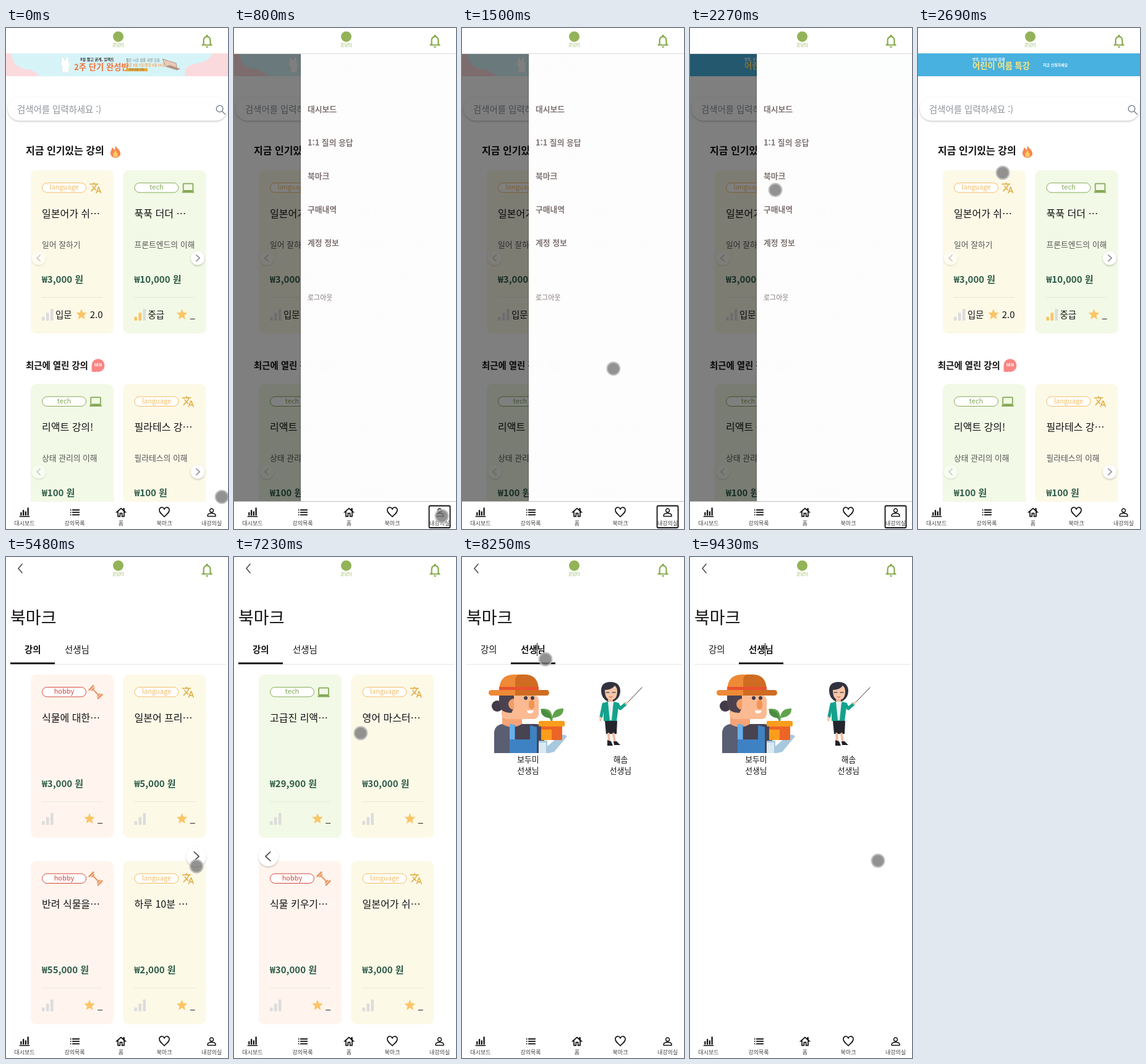
Recreate the animation shown at these times as an HTML page. Size 359 by 810 pixels, loop 9.5 s.

```html
<!DOCTYPE html>
<html lang="ko">
<head>
<meta charset="utf-8">
<style>
html, body { margin: 0; width: 100%; height: 100%; overflow: hidden; background: #fff; }
svg { display: block; width: 359px; height: 810px; font-family: "Noto Sans CJK KR", "Noto Sans CJK", sans-serif; }
</style>
</head>
<body>
<svg id="stage" viewBox="0 0 359 810"></svg>
<script>
const LOOP = 9500;

// Drawing helpers: each returns SVG markup
const text = (x, cy, s, size, weight = 400, fill = '#111', anchor = 'start') =>
  `<text x="${x}" y="${cy + size * .36}" font-size="${size}" font-weight="${weight}" fill="${fill}" text-anchor="${anchor}">${s}</text>`;
const rect = (x, y, w, h, fill, r = 0, more = '') =>
  `<rect x="${x}" y="${y}" width="${w}" height="${h}" rx="${r}" fill="${fill}" ${more}/>`;
const disc = (x, y, r, fill, more = '') => `<circle cx="${x}" cy="${y}" r="${r}" fill="${fill}" ${more}/>`;
const path = (d, fill, more = '') => `<path d="${d}" fill="${fill}" ${more}/>`;
const line = (d, color, width) =>
  path(d, 'none', `stroke="${color}" stroke-width="${width}" stroke-linecap="round" stroke-linejoin="round"`);
const group = (id, body, more = '') => `<g id="${id}" ${more}>${body}</g>`;
// Places a 24-unit icon around a centre
const icon = (body, cx, cy, size, color) =>
  `<g transform="translate(${cx - size / 2} ${cy - size / 2}) scale(${size / 24})" fill="${color}">${body}</g>`;
const glyph = d => `<path d="${d}"/>`;

const icons = {
  language: glyph('M12.87 15.07l-2.54-2.51.03-.03c1.74-1.94 2.98-4.17 3.71-6.53H17V4h-7V2H8v2H1v1.99h11.17C11.5 7.92 10.44 9.75 9 11.35 8.07 10.32 7.3 9.19 6.69 8h-2c.73 1.63 1.73 3.17 2.98 4.56l-5.09 5.02L4 19l5-5 3.11 3.11.76-2.04zM18.5 10h-2L12 22h2l1.12-3h4.75L21 22h2l-4.5-12zm-2.62 7l1.62-4.33L19.12 17h-3.24z'),
  tech: glyph('M20 18c1.1 0 2-.9 2-2V5c0-1.1-.9-2-2-2H4c-1.1 0-2 .9-2 2v11c0 1.1.9 2 2 2H1v3h22v-3zM4 5h16v11H4z'),
  hobby: '<g transform="rotate(45 12 12)"><path d="M4 10.8h16v2.4H4zM-1 5.5h3.2v13H-1zM3.2 8h2.4v8H3.2zM21.8 5.5H25v13h-3.2zM18.4 8h2.4v8h-2.4z"/></g>',
  bell: glyph('M12 22c1.1 0 2-.9 2-2h-4c0 1.1.9 2 2 2zm6-6v-5c0-3.07-1.63-5.64-4.5-6.32V4c0-.83-.67-1.5-1.5-1.5s-1.5.67-1.5 1.5v.68C7.64 5.36 6 7.92 6 11v5l-2 2v1h16v-1l-2-2zm-2 1H8v-6c0-2.48 1.51-4.5 4-4.5s4 2.02 4 4.5v6z'),
  star: glyph('M12 17.27L18.18 21l-1.64-7.03L22 9.24l-7.19-.61L12 2 9.19 8.63 2 9.24l5.46 4.73L5.82 21z'),
  chart: glyph('M1 20h22v2H1zM3 12h3v7H3zM8 7h3v12H8zM13 10h3v9h-3zM18 2h3v17h-3z'),
  list: glyph('M3 6h2v2.4H3zM7 6h15v2.4H7zM3 11h2v2.4H3zM7 11h15v2.4H7zM3 16h2v2.4H3zM7 16h15v2.4H7z'),
  home: glyph('M12 5.7l5 4.5V19h-2v-6H9v6H7v-8.8zM12 3L1 12.7h4V21h6v-6h2v6h6v-8.3h4l-4-3.6V4h-3v2.4z'),
  heart: line('M12 20.5C4 13.500 2.500 11.500 2.500 8.500A4.800 4.800 0 0 1 12 6.200A4.800 4.800 0 0 1 21.500 8.500C21.500 11.500 20 13.500 12 20.500z', '#111', 2),
  person: line('M12 4a4 4 0 1 0 .01 0zM3.500 20.500v-2.500c0-2.500 5-4 8.500-4s8.500 1.500 8.500 4v2.500z', '#111', 2)
};

const kinds = {
  language: { bg: '#fcf9e7', ink: '#f3bd68', mark: '#e0b04a' },
  tech: { bg: '#f2f9e6', ink: '#86a957', mark: '#86a957' },
  hobby: { bg: '#fff5ee', ink: '#d4473c', mark: '#ee9563' }
};

function card(x, y, kind, title, price, { sub = '', level = '', lit = 0, rate = '_' } = {}) {
  const { bg, ink, mark } = kinds[kind];
  const starX = x + (rate === '_' ? 95 : 82);
  const bars = [0, 1, 2].map(i =>
    rect(x + 18 + i * 7, y + 237 - i * 6.5, 4.5, 6 + i * 6.5, i < lit ? '#f8c469' : '#dcdcdc')).join('');
  return rect(x, y, 134, 264, bg, 9) +
    rect(x + 18.5, y + 20.5, 71, 15.5, '#fff', 7.75, `stroke="${ink}"`) +
    text(x + 54, y + 27.5, kind, 11, 500, ink, 'middle') +
    icon(icons[kind], x + 105, y + 28.5, 21, mark) +
    text(x + 18, y + 70, title, 16, 500) +
    text(x + 18, y + 120, sub, 12.8, 400, '#555') +
    text(x + 18, y + 176.500, price + ' 원', 15, 700, '#2f5d49') +
    rect(x + 18, y + 205, 98, 1, '#e9e7dc') + bars +
    text(x + 40, y + 234, level, 14.4) +
    icon(icons.star, starX, y + 233, 21, '#fbc566') +
    text(x + 116.500, y + 234, rate, 15, 400, '#111', 'end');
}

const arrow = (id, x, y, r, dir, color, opacity = 1) => group(id,
  disc(x, y, r, '#fff', 'filter="url(#soft)"') +
  line(`M${x - dir * r * .2} ${y - r * .45}l${dir * r * .48} ${r * .45}l${-dir * r * .48} ${r * .45}`, color, 1.8),
  `opacity="${opacity}"`);
const arrowPair = y => arrow('', 53, y, 11, -1, '#aaa', .5) + arrow('', 310, y, 11, 1, '#999');

const bannerPink =
  rect(0, 41, 359, 37, '#d6f4f8') +
  path('M0 41h8c3 12 8 20 18 23s20 3 28 14H0z', '#fbdadd') +
  path('M8 41h76c-18 2-11 10-18 17s-18 5-25 8s-22-2-27-9z', '#d6f4f8') +
  path('M290 78c-3-15 6-18 20-21s20-7 23-16h26v37z', '#fbdadd') +
  path('M91 72V62q-4-2-1-8V48q3-3 4 4h2q1-8 5-4v6q4 6 1 9v9z', '#fff', 'stroke="#ddd" stroke-width=".6"') +
  text(120, 51, '8월 짧고 굵게, 임팩트', 6, 700, '#333') +
  text(110, 63, '2주 단기 완성반', 13.3, 900, '#f4743b') +
  text(194, 52, '짧은 시간 집중 과정 모집', 5.3, 400, '#777') +
  text(194, 60, '개강 8월 7일/종강 8월 18일', 5.3, 700, '#f3a75c') +
  rect(194, 65, 35, 5, '#e4a93c') + text(211, 67.5, '지금 바로 신청', 4, 400, '#765', 'middle') +
  path('M253 50l22 7 2 11-19-6z', '#e8c9b6', 'stroke="#97786b" stroke-width=".7"') +
  path('M258 62l19 6 5-2-17-6z', '#b89282');
const bannerBlue =
  rect(359, 41, 359, 37, '#48b1df') +
  text(447, 51, '방학, 우리 아이와 함께', 5.5, 700, '#fff') +
  text(447, 61, '어린이 여름 특강', 13.3, 900, '#ffe67a') +
  text(561, 60, '지금 신청하세요', 6, 700, '#fff');

const home =
  group('banner', bannerPink + bannerBlue) +
  rect(3, 112, 355, 37.5, '#fff', 18.75, 'filter="url(#soft)"') +
  text(18, 131.500, '검색어를 입력하세요 :)', 14.4, 500, '#8d9399') +
  disc(345.500, 130.500, 5.3, 'none', 'stroke="#81888c" stroke-width="1.500"') + line('M349.500 134.500l5 5', '#81888c', 1.5) +
  text(32, 198.500, '지금 인기있는 강의', 16, 700) +
  path('M176 188c1 6 9 8 9 15c0 4-4 7-8 7s-8-3-8-8c0-4 3-5 2-9c3 1 4 3 4 5c2-3 2-6 1-10z', '#f6874d') +
  path('M177 197c1 4 4 5 4 8c0 3-2 4-4 4s-4-1-4-4s3-4 4-8z', '#fcc862') +
  card(40, 230, 'language', '일본어가 쉬⋯', '₩3,000', { sub: '일어 잘하기', level: '입문', rate: '2.0' }) +
  card(189.500, 230, 'tech', '푹푹 더더 ⋯', '₩10,000', { sub: '프론트엔드의 이해', level: '중급', lit: 2 }) +
  arrowPair(372) +
  text(32, 545.500, '최근에 열린 강의', 14.4, 700) +
  disc(149, 545.500, 10.500, '#fa8683') + rect(138.500, 545.500, 8, 10.500, '#fa8683', 2) +
  text(149, 545.500, 'NEW', 5.5, 700, '#fff', 'middle') +
  card(40, 575.500, 'tech', '리액트 강의!', '₩100', { sub: '상태 관리의 이해' }) +
  card(189.500, 575.500, 'language', '필라테스 강⋯', '₩100', { sub: '필라테스의 이해' }) +
  arrowPair(717.500);

const cardGrid = list => list.map((c, i) => card(i % 2 ? 189.500 : 40, i < 2 ? 190 : 491.500, ...c)).join('');
const firstCards = cardGrid([
  ['hobby', '식물에 대한⋯', '₩3,000'], ['language', '일본어 프리⋯', '₩5,000'],
  ['hobby', '반려 식물을⋯', '₩55,000'], ['language', '하루 10분 ⋯', '₩2,000']]);
const lastCards = cardGrid([
  ['tech', '고급진 리액⋯', '₩29,900'], ['language', '영어 마스터⋯', '₩30,000'],
  ['hobby', '식물 키우기⋯', '₩30,000'], ['language', '일본어가 쉬⋯', '₩3,000']]);

const gardener =
  path('M52 317v-30q0-17 17-17h50q14 0 14 17v30z', '#484351') +
  path('M52 317v-30q0-17 17-17h8v47z', '#5a5e73') +
  path('M65 257h32v13q-16 10-32 0z', '#f6a477') +
  rect(64, 224, 60, 38, '#fbba92', 8) +
  disc(57, 241, 9, '#423a48') + path('M60 224h27v14l-7 14q-20 0-20-16z', '#4c424f') +
  disc(84, 238, 9, '#f59e66') + rect(84, 224, 12, 32, '#fbba92') +
  disc(103, 228, 3, '#423a48') + disc(114, 228, 3, '#423a48') +
  rect(108, 231, 9, 15, '#f39552', 4.5) + path('M105 248h11q-1 5-6 5t-5-5z', '#fff') +
  path('M60 217q0-27 24-27h17q23 0 23 27z', '#ee8a36') + path('M86 217v-18q0-9 9-9h6q23 0 23 27z', '#cf6c22') +
  rect(60, 210, 64, 6, '#e9522e') + rect(43, 215, 98, 9, '#ee8a36', 4.5) + path('M86 215h50a4.500 4.500 0 0 1 0 9H86z', '#cf6c22') +
  path('M77 317v-47l9 2v23h24v-23l11 3v42z', '#3e82c4') + path('M77 270l8 1v24h-8z', '#6daee4') +
  path('M124 317v-20h14v9l20-17q8-4 12 1l-21 25-8 2z', '#a7c8de') + path('M124 300h12v17h-12z', '#d9eaf3') +
  path('M144 266q-3-10-18-20q19-4 20 13q2-15 18-14q1 13-17 15l-1 6z', '#60a34b') +
  path('M128 246q-2 13 16 15q0-11-16-15z', '#4c8b42') +
  rect(128, 273, 34, 23, '#ed6427', 2) + rect(128, 279, 17, 17, '#f99d1c') + rect(124, 265, 42, 9, '#f99d1c', 2);
const lecturer =
  line('M266 237L291 211', '#333', 1) +
  path('M225 216q0-14 15-14t16 14q0 13-12 18h-8q-11-6-11-18z', '#30333f') +
  path('M231 215q11 0 16-7q4 3 4 9q0 14-10 14t-10-16z', '#f7c6a8') +
  line('M233 219h5M243 219h5', '#555', 1.3) + line('M238 226q3 2 5 0', '#c34b4b', 1) +
  path('M236 230h8v8h-8z', '#f0b595') +
  path('M229 236l8-3 4 10 5-9 8 2-4 29h-21z', '#14a28d') + path('M236 234h9l-3 30h-3z', '#eef3f3') +
  line('M229 238l-4 20', '#14a28d', 5) + line('M224 260l0 4', '#f7c6a8', 3.5) +
  line('M252 239l4 6 8-7', '#14a28d', 5) + line('M265 237l2-2', '#f7c6a8', 3.5) +
  path('M231 265h20l-1 21h-17z', '#24262e') +
  line('M237 286l1 12M245 286l2 13', '#f2bda1', 4) +
  path('M235 296l6 2 3 7h-9zM245 298l5 0 6 6h-10z', '#20222a');

const tab = (id, second) => group(id,
  text(30, 150, '강의', 14.4, second ? 400 : 700) +
  text(95, 150, '선생님', 14.4, second ? 700 : 400) +
  rect(7, 173, 349, 1, '#e6e6e6') + rect(second ? 79 : 7, 170.500, 72, 2.8, '#111'));
const bookmarks =
  line('M26 11.500l-6 7 6 7', '#555', 1.8) +
  text(7, 98, '북마크', 27, 500) +
  group('lessons', tab('', false) + group('first', firstCards) + group('last', lastCards) +
    arrow('prev', 55.500, 484, 16, -1, '#555') + arrow('next', 307.500, 484, 16, 1, '#555')) +
  group('teachers', tab('', true) + gardener + lecturer +
    text(107, 327, '보두미', 12.8, 500, '#111', 'middle') + text(107, 345, '선생님', 12.8, 400, '#111', 'middle') +
    text(256.500, 327, '해솜', 12.8, 500, '#111', 'middle') + text(256.500, 345, '선생님', 12.8, 400, '#111', 'middle')) +
  group('titleCaret', rect(7, 78, 1, 38, '#111')) +
  group('tabCaret', rect(121, 139, 1, 21, '#111'));

const drawer = rect(108, 41, 251, 725, '#fff', 0, 'fill-opacity=".985" filter="url(#soft)"') +
  ['대시보드', '1:1 질의 응답', '북마크', '구매내역', '계정 정보']
    .map((s, i) => text(119, 131.500 + i * 54, s, 12.8, 700, '#807473')).join('') +
  text(119, 436, '로그아웃', 11, 500, '#807473');

const navItems = [[30, 'chart', '대시보드', 18], [111, 'list', '강의목록', 19], [186, 'home', '홈', 20],
  [256, 'heart', '북마크', 20], [332.500, 'person', '내강의실', 18]];
const nav = rect(0, 766, 359, 44, '#fff') + navItems.map(([x, name, label, size]) =>
  icon(icons[name], x, 783, size, '#111') + text(x, 800.500, label, 9, 400, '#444', 'middle')).join('') +
  group('focus', rect(315.500, 772.500, 34, 35.500, 'none', 2, 'stroke="#111" stroke-width="1.800"'));

const header =
  disc(181.500, 14, 8.5, '#93b358') + text(181.500, 28, '온담터', 6.5, 400, '#93b358', 'middle') +
  icon(icons.bell, 325, 21, 26, '#86ab4b');

const stage = document.getElementById('stage');
stage.innerHTML =
  `<defs><filter id="soft" x="-20%" y="-30%" width="140%" height="160%">
    <feDropShadow dx="0" dy="1.500" stdDeviation="1.800" flood-color="#000" flood-opacity=".24"/></filter></defs>` +
  rect(0, 0, 359, 810, '#fff') +
  group('home', home) + group('bookmarks', bookmarks) +
  group('shade', rect(0, 41, 359, 725, '#000')) + group('drawer', drawer) +
  group('edges', rect(0, 41, 359, 1, '#ddd') + rect(0, 765, 359, 1, '#bbb')) +
  nav + header +
  group('cursor', disc(0, 0, 10.3, '#777', 'fill-opacity=".8" stroke="#bbb" stroke-opacity=".85" stroke-width="2.400"'));

const parts = Object.fromEntries([...stage.querySelectorAll('g[id]')].map(g => [g.id, g]));
const show = (id, on) => { parts[id].style.display = on ? '' : 'none'; };
const move = (id, x, y) => parts[id].setAttribute('transform', `translate(${x} ${y})`);
const progress = (t, a, b) => Math.min(1, Math.max(0, (t - a) / (b - a)));
const ease = p => p * p * (3 - 2 * p);
const within = (t, ...spans) => spans.some(([a, b]) => t >= a && t < b);

// time, x, y
const trail = [[0, 349, 758], [400, 336, 789], [1080, 336, 789], [1990, 139, 274], [2270, 138, 262], [2420, 137, 234],
  [4200, 137, 234], [4440, 135, 231], [4950, 135, 231], [5440, 308, 500], [5500, 308, 500], [5650, 310, 496],
  [6850, 310, 496], [7230, 205, 285], [7790, 122, 148], [8200, 122, 148], [8870, 293, 376],
  [9200, 293, 376], [9420, 304, 491], [LOOP, 304, 491]];

function draw(t) {
  const isHome = t < 4040, onTeachers = t >= 7920, pageTurned = t >= 5750;
  show('home', isHome);
  show('bookmarks', !isHome);
  move('banner', -359 * ease(progress(t, 1500, 1800)), 0);

  const open = ease(progress(t, 480, 720)) - ease(progress(t, 2450, 2690));
  parts.shade.setAttribute('opacity', open * .5);
  move('drawer', 256 * (1 - open), 0);
  for (const id of ['drawer', 'shade', 'edges']) show(id, open > 0);
  show('focus', within(t, [440, 2480]));

  show('lessons', !onTeachers);
  show('teachers', onTeachers);
  show('first', !pageTurned);
  show('last', pageTurned);
  show('prev', pageTurned);
  show('next', t < 6480);
  show('titleCaret', within(t, [4040, 4240], [4790, 5310], [6480, 7010], [7540, 7920]));
  show('tabCaret', within(t, [7920, 8450], [9020, LOOP]));

  const i = trail.findIndex(k => k[0] > t);
  const [a, ax, ay] = trail[i - 1], [b, bx, by] = trail[i], p = progress(t, a, b);
  move('cursor', ax + (bx - ax) * p, ay + (by - ay) * p);
}

const start = performance.now();
function tick() {
  draw((performance.now() - start) % LOOP);
  requestAnimationFrame(tick);
}
tick();
</script>
</body>
</html>
```
